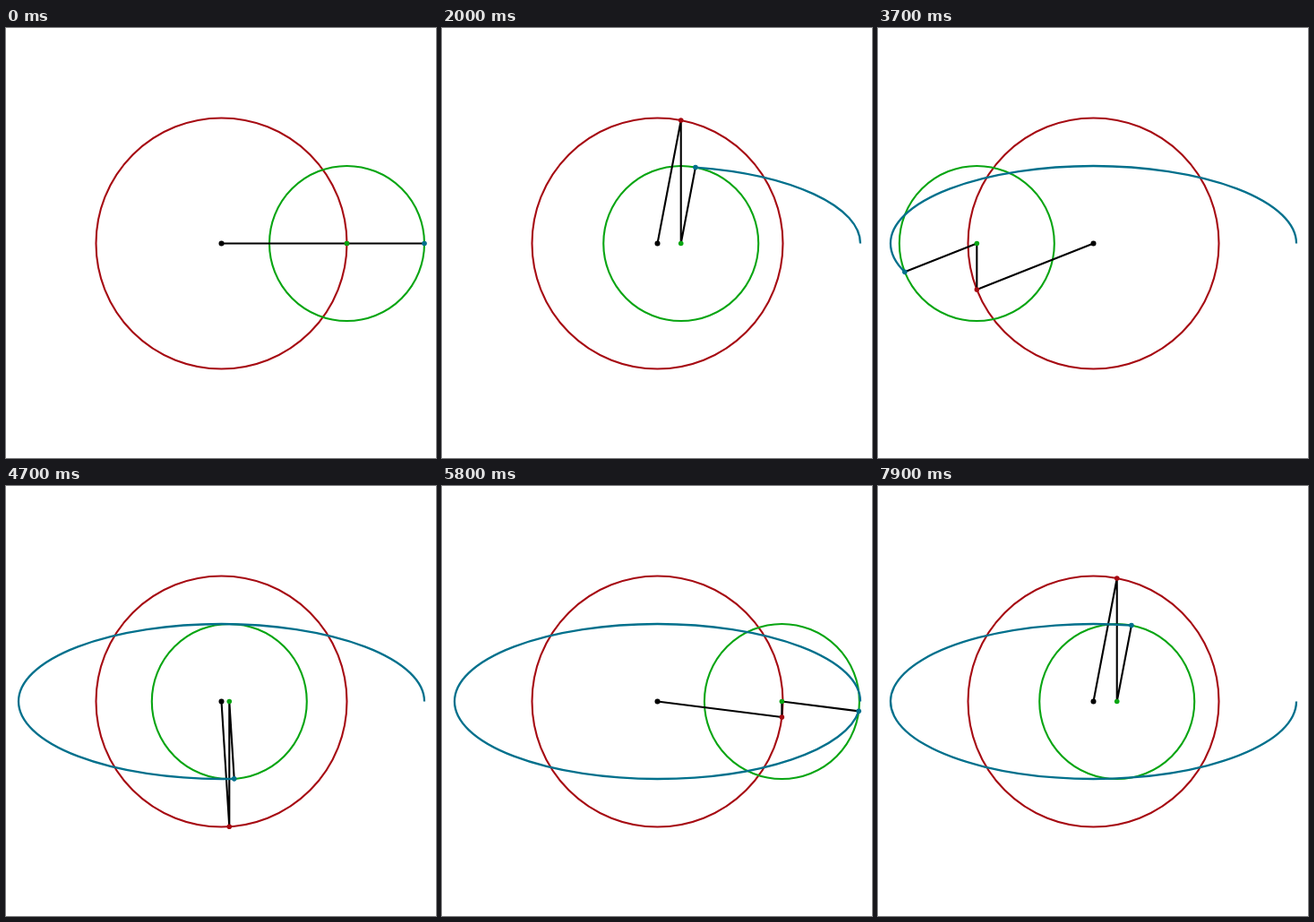
Write an HTML page with a canvas that moves like this. It is 480 by 480 pixels and loops after 8 s.

```html
<!DOCTYPE html>
<html lang="en">
<head>
<meta charset="utf-8">
<title>Ellipse from two circles</title>
<style>
  html, body { margin: 0; width: 100%; height: 100%; overflow: hidden; background: #fff; }
  canvas { display: block; width: 480px; height: 480px; }
</style>
</head>
<body>
<canvas id="stage" width="480" height="480"></canvas>
<script>
const ctx = document.getElementById('stage').getContext('2d');
const C = 240.5, R = 140, r = 86.5;
const TURN = 2 * Math.PI;
const RED = '#a60a12', GREEN = '#08a512', BLUE = '#00708c', BLACK = '#000';

const LOOP = 8000, STEP = 100, STEPS = 50;
const DRAW_AT = 9, ERASE_AT = 68;

function ring(x, y, radius, color) {
  ctx.strokeStyle = color;
  ctx.beginPath();
  ctx.arc(x, y, radius, 0, TURN);
  ctx.stroke();
}

function dot(x, y, radius, color) {
  ctx.fillStyle = color;
  ctx.beginPath();
  ctx.arc(x, y, radius, 0, TURN);
  ctx.fill();
}

// Angles run counter-clockwise from the right.
function trace(from, to) {
  if (to <= from) return;
  ctx.strokeStyle = BLUE;
  ctx.lineWidth = 2.3;
  ctx.beginPath();
  ctx.ellipse(C, C, R + r, r, 0, -from, -to, true);
  ctx.stroke();
}

function draw(angle, erasing) {
  const cos = Math.cos(angle), sin = Math.sin(angle);
  const x = C + R * cos, y = C - R * sin;
  const penX = x + r * cos, penY = C - r * sin;

  ctx.fillStyle = '#fff';
  ctx.fillRect(0, 0, 480, 480);
  ctx.lineWidth = 2.1;
  ring(C, C, R, RED);
  ring(x, C, r, GREEN);

  ctx.strokeStyle = BLACK;
  ctx.lineJoin = 'round';
  ctx.beginPath();
  ctx.moveTo(C, C);
  ctx.lineTo(x, y);
  ctx.lineTo(x, C);
  ctx.lineTo(penX, penY);
  ctx.stroke();

  if (erasing) trace(angle, TURN);
  else trace(0, angle);

  dot(C, C, 3, BLACK);
  dot(x, y, 2.8, RED);
  dot(x, C, 2.8, GREEN);
  dot(penX, penY, 2.8, BLUE);
}

function tick(now) {
  const step = Math.floor((now % LOOP) / STEP);
  const erasing = step >= ERASE_AT;
  const moved = step - (erasing ? ERASE_AT : DRAW_AT);
  draw(Math.min(Math.max(moved, 0), STEPS) / STEPS * TURN, erasing);
  requestAnimationFrame(tick);
}

draw(0, false);
requestAnimationFrame(tick);
</script>
</body>
</html>
```
